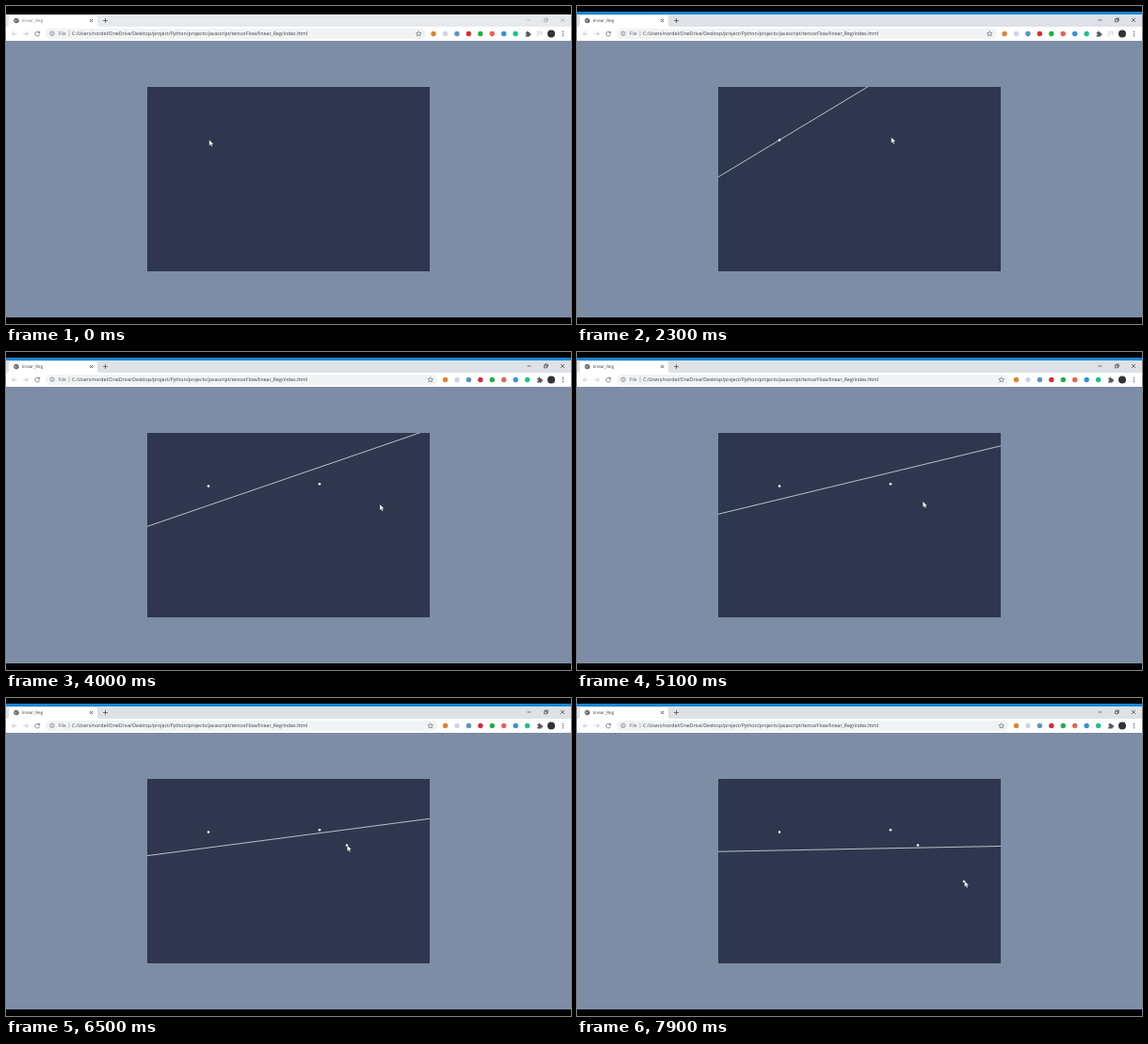
An HTML page for the animation above (8000 ms loop, 600x338 px).

```html
<!DOCTYPE html>
<html lang="en">
<head>
<meta charset="utf-8">
<title>linear_Reg</title>
<style>
html, body { margin: 0; width: 100%; height: 100%; overflow: hidden; background: #000; }
#stage { display: block; width: 600px; height: 338px; }
text { font-family: "Open Sans", "Noto Sans", sans-serif; text-rendering: geometricPrecision; }
.icon { fill: none; stroke-width: .8; }
</style>
</head>
<body>
<svg id="stage" viewBox="0 0 600 338">
  <rect width="600" height="338"/>
  <rect id="accent" y="6" width="600" height="3" fill="#1787d4"/>
  <rect id="strip" y="9" width="600" height="13"/>
  <path d="M1 22q2 0 2-2v-7.5q0-2.5 2.500-2.500h89q2.500 0 2.500 2.500v7.500q0 2 2 2z" fill="#fff"/>
  <rect y="22" width="600" height="15" fill="#fff"/>
  <rect y="37" width="600" height="294" fill="#7d8da6"/>

  <g id="tab">
    <circle cx="11" cy="15.500" r="2.700" fill="#5f6368"/>
    <path d="M9.200 14.800l1.800 .8-.6 1.500M11.400 13.500l1.400 1.200" class="icon" stroke="#fff" style="stroke-width:.6"/>
    <text id="title" x="17" y="17.200" font-size="4.600">linear_Reg</text>
    <path d="M89 14l3 3m0-3l-3 3" class="icon" stroke="#444"/>
    <path d="M103 15.500h5m-2.500-2.500v5" class="icon" stroke="#555"/>
  </g>
  <g id="winButtons" class="icon">
    <path d="M553.500 15h4M571.500 14h2.800v2.800h-2.800zM572.500 14v-1h2.800v2.800h-1M589 13l4 4m0-4l-4 4" style="stroke-width:.6"/>
  </g>

  <g class="icon">
    <path d="M11.500 29.500h-5m2.300-2.300l-2.300 2.300 2.300 2.300M18.500 29.500h5m-2.300-2.300l2.300 2.300-2.300 2.300" stroke="#c2c4c7"/>
    <path d="M35.200 28a2.400 2.400 0 1 0 .5 2.200M35.700 26.800v1.900h-1.900" stroke="#5f6368"/>
  </g>
  <rect id="bar" x="42" y="24" height="11" rx="5.500" fill="#f1f3f4"/>
  <g class="icon" stroke="#5f6368" style="stroke-width:.6">
    <circle cx="49" cy="29.300" r="2.200"/>
    <path d="M49 29v1.500M49 27.800v.6"/>
    <path d="M67 26.300v6" stroke="#999"/>
  </g>
  <text x="55.500" y="31.200" font-size="5.160" fill="#5f6368">File</text>
  <text x="70" y="31.200" font-size="5.160" fill="#33363a">C:/Users/nordel/OneDrive/Desktop/project/Python/projects/javascript/tensorFlow/linear_Reg/index.html</text>

  <g id="tools">
    <path d="M438.200 26.700l.8 1.900 2 .1-1.600 1.300.6 2-1.800-1.100-1.800 1.100.6-2-1.600-1.300 2-.1z" class="icon" stroke="#5f6368" style="stroke-width:.6"/>
    <g id="extensions"></g>
    <path d="M551.700 28h1.400q-.3-1.600 .8-1.600t.8 1.600h1.500v1.400q1.500-.2 1.500 .9t-1.500 .9v1.200h-4.500v-1.500q1.300-.1 1.300-.8t-1.300-.8z" fill="#55585c"/>
  </g>
  <path id="queue" d="M563.500 27.500h4m-4 1.800h4m-4 1.800h2.500M568.500 31v-3.500h1" class="icon" stroke="#c2c4c7" style="stroke-width:.7"/>
  <circle cx="579" cy="29.500" r="4" fill="#303338"/>
  <g fill="#5f6368"><circle cx="591.500" cy="27.300" r=".7"/><circle cx="591.500" cy="29.500" r=".7"/><circle cx="591.500" cy="31.700" r=".7"/></g>

  <svg x="150" y="86" width="300" height="196">
    <rect width="300" height="196" fill="#2f374f"/>
    <line id="fit" x1="0" x2="300" stroke="#fff" stroke-width=".75" stroke-opacity=".9"/>
    <g id="dots" fill="#fff"></g>
  </svg>
  <path id="cursor" d="M0 0v6.300l1.500-1.300 1 2.300 1.100-.5-1-2.200h2z" fill="#fff" stroke="#222" stroke-width=".25"/>
</svg>
<script>
const LOOP = 8000, FRAME = 100, STEP = 20, RATE = 0.104;
const W = 300, H = 196, FOCUS = 900, SHIFT = 2400;
const $ = id => document.getElementById(id);

function add(parent, tag, attrs) {
  const el = document.createElementNS("http://www.w3.org/2000/svg", tag);
  for (const k in attrs) el.setAttribute(k, attrs[k]);
  return parent.appendChild(el);
}

["#dc8430", "#cbd7e8", "#5b93c4", "#cf3038", "#20ae4a", "#df6655", "#3c8ddb", "#1fbf92"]
  .forEach((fill, i) => add($("extensions"), "circle", { cx: 454 + i * 12.45, cy: 29.5, r: 2.7, fill }));

// Clicked points: time, then position inside the canvas
const points = [[900, 65, 56.5], [2520, 183, 54.3], [6100, 212, 70.5], [7720, 261, 109]]
  .map(([t, x, y]) => ({ t, x: x / W, y: 1 - y / H, dot: add($("dots"), "circle", { cx: x, cy: y, r: 1.3 }) }));

// Gradient descent on y = m x + b, one entry per step
const fits = [];
let m = 0.978, b = 0.76;
for (let t = 0; t <= LOOP; t += STEP) {
  fits.push([m, b]);
  const live = points.filter(p => p.t <= t);
  let dm = 0, db = 0;
  for (const p of live) {
    const err = 2 * (m * p.x + b - p.y) / live.length;
    dm += err * p.x;
    db += err;
  }
  m -= RATE * 2 * dm;
  b -= RATE * 2 * db;
  // keep the same pace per second as 52 half-size updates
  m += RATE * dm;
  b += RATE * db;
}

// Pointer path: time, x, y
const path = [
  [0, 215.8, 142.3], [1200, 215.8, 142.3], [1700, 254, 139.8], [2200, 333.7, 139.5], [2600, 333.7, 139.5],
  [3000, 381.3, 149.5], [3400, 404, 158], [4000, 397, 162], [5100, 367.3, 158.8],
  [5600, 362.3, 156.5], [6500, 362.3, 156.5], [7000, 404, 185], [7400, 411.5, 194.5], [8000, 411.5, 194.5]
];

function pointer(t) {
  const i = path.findIndex(k => k[0] > t);
  const [t0, x0, y0] = path[i - 1], [t1, x1, y1] = path[i];
  const u = (t - t0) / (t1 - t0), e = u * u * (3 - 2 * u);
  return [x0 + (x1 - x0) * e, y0 + (y1 - y0) * e];
}

function show(id, on) { $(id).setAttribute("visibility", on ? "visible" : "hidden"); }

function draw(now) {
  const t = Math.floor(now % LOOP / FRAME) * FRAME;
  const active = t >= FOCUS, wide = t >= SHIFT;
  show("accent", active);
  $("strip").setAttribute("fill", active ? "#dee1e6" : "#e7eaed");
  $("title").setAttribute("fill", active ? "#3c4043" : "#777b80");
  $("winButtons").setAttribute("stroke", active ? "#222" : "#999");
  $("bar").setAttribute("width", wide ? 416.5 : 404);
  $("tools").setAttribute("transform", `translate(${wide ? 12.5 : 0})`);
  show("queue", !wide);

  const [slope, base] = fits[t / STEP];
  $("fit").setAttribute("y1", (1 - base) * H);
  $("fit").setAttribute("y2", (1 - base - slope) * H);
  show("fit", active);
  for (const p of points) p.dot.setAttribute("visibility", t >= p.t ? "visible" : "hidden");
  $("cursor").setAttribute("transform", `translate(${pointer(t)})`);
  requestAnimationFrame(draw);
}
requestAnimationFrame(draw);
</script>
</body>
</html>
```
